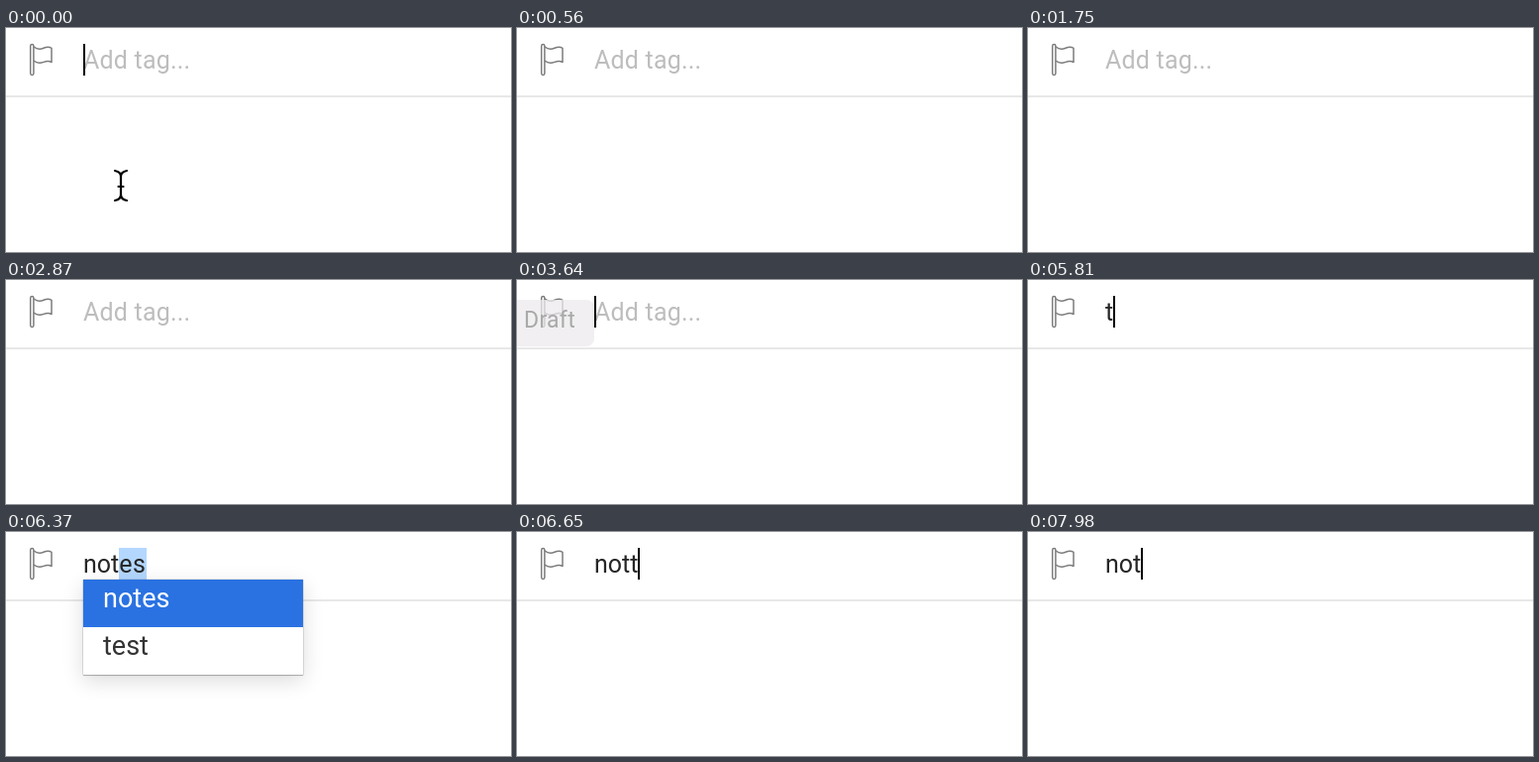
Animation, 510 px wide and 226 px high, one loop 8000 ms. Source, as an HTML page:

```html
<!DOCTYPE html>
<html lang="en">
<head>
<meta charset="utf-8">
<title>Tag field</title>
<style>
  html, body { margin: 0; width: 100%; height: 100%; overflow: hidden; background: #fff; }
  body { font-family: Roboto, sans-serif; }
  .stage { position: relative; width: 510px; height: 226px; overflow: hidden; background: #fff; }
  .stage > * { position: absolute; }
  .anim { animation: 8s step-end -4ms infinite; }

  .rule { left: 0; top: 68px; width: 510px; height: 2px; background: #e8e8e8; }
  svg { left: 0; top: 0; fill: none; overflow: visible; }
  .flag { stroke: #7c7c7c; stroke-width: 1.5; stroke-linejoin: round; }

  .token {
    left: 0; top: 20px; width: 90px; height: 47px; border-radius: 8px;
    background: rgba(237, 234, 237, .75); color: #a9a9a9;
    font-size: 23px; line-height: 41px; letter-spacing: .3px; text-align: center;
    animation-name: drag;
  }

  /* One line of the strip shows at a time */
  .field { left: 78px; top: 16px; width: 240px; height: 32px; overflow: hidden; }
  .lines { font-size: 25px; line-height: 34px; color: #262626; animation-name: type; }
  .lines div { height: 40px; }
  .hint { color: #bdbdbd; letter-spacing: .2px; }
  .rest { display: inline-block; width: 28px; height: 32px; background: #b3d7ff; letter-spacing: .4px; vertical-align: top; }

  .caret { left: 78px; top: 16px; width: 2px; height: 32px; background: #000; animation-name: caret; }

  .menu {
    left: 78px; top: 48px; width: 222px; height: 96px; background: #fff;
    font-size: 27px; line-height: 39px; color: #333;
    box-shadow: 0 0 1px rgba(0, 0, 0, .5), 0 1px 1px rgba(0, 0, 0, .2), 0 6px 20px rgba(0, 0, 0, .14);
    animation-name: menu;
  }
  .menu div { height: 48px; padding-left: 20px; }
  .menu .picked { background: #2a72e2; color: #fff; }

  .pointer { stroke: #000; stroke-width: 2.2; stroke-linecap: round; animation-name: pointer; }

  @keyframes pointer {
    0% { transform: translate(116px, 159px); opacity: 1; }
    .875% { transform: translate(150px, 146px); opacity: 1; }
    1.75% { transform: translate(172px, 110px); opacity: 1; }
    2.625% { transform: translate(90px, 92px); opacity: 1; }
    3.5% { transform: translate(20px, 60px); opacity: 1; }
    4.375%, 100% { transform: translate(-20px, 40px); opacity: 0; }
  }
  @keyframes drag {
    0%, 30.625%, 48.125%, 100% { transform: translateX(-100px); }
    24.5% { transform: translateX(-60px); }
    25.375% { transform: translateX(20px); }
    26.25% { transform: translateX(93px); }
    28% { transform: translateX(70px); }
    28.875% { transform: translateX(0); }
    29.75% { transform: translateX(-60px); }
    42% { transform: translateX(-70px); }
    42.875% { transform: translateX(10px); }
    43.75% { transform: translateX(75px); }
    44.625% { transform: translateX(60px); }
    45.5% { transform: translateX(-12px); }
    46.375% { transform: translateX(-55px); }
    47.25% { transform: translateX(-80px); }
  }
  @keyframes type {
    0% { transform: translateY(0); }
    72.625% { transform: translateY(-40px); }
    75.25% { transform: translateY(-80px); }
    78.75% { transform: translateY(-120px); }
    82.25% { transform: translateY(-160px); }
    99.75%, 100% { transform: translateY(-200px); }
  }
  @keyframes caret {
    0%, 14%, 28.875%, 42.875%, 58.625% { transform: translateX(0); opacity: 1; }
    7%, 21.875%, 35.875%, 50.75%, 65.625% { transform: translateX(0); opacity: 0; }
    72.625% { transform: translateX(8px); opacity: 1; }
    75.25% { transform: translateX(22px); opacity: 1; }
    78.75% { transform: translateX(36px); opacity: 0; }
    82.25%, 96.25% { transform: translateX(44px); opacity: 1; }
    89.25% { transform: translateX(44px); opacity: 0; }
    99.75%, 100% { transform: translateX(36px); opacity: 1; }
  }
  @keyframes menu {
    0%, 83.125%, 100% { opacity: 0; }
    78.75% { opacity: 1; }
    82.25% { opacity: .4; }
  }
</style>
</head>
<body>
<div class="stage">
  <div class="rule"></div>
  <svg class="flag" width="510" height="226">
    <rect x="24.7" y="16.6" width="3.2" height="30.8" rx="1.6"/>
    <path d="M28 18.7C31 21.5 35 21.5 38 20.2C41 19 44 19 46 20.3V34.6C44 33.2 41 33.2 38 34.4C35 35.6 31 35.6 28 33"/>
  </svg>
  <div class="token anim">Draft</div>
  <div class="field">
    <div class="lines anim">
      <div class="hint">Add tag...</div>
      <div>t</div>
      <div>to</div>
      <div>not<span class="rest">es</span></div>
      <div>nott</div>
      <div>not</div>
    </div>
  </div>
  <div class="caret anim"></div>
  <div class="menu anim">
    <div class="picked">notes</div>
    <div>test</div>
  </div>
  <svg width="510" height="226">
    <path class="pointer anim" d="M-6-15Q0-14 0-9Q0-14 6-15M0-9V9M-6 15Q0 14 0 9Q0 14 6 15M-2.5 1H2.5"/>
  </svg>
</div>
</body>
</html>
```
